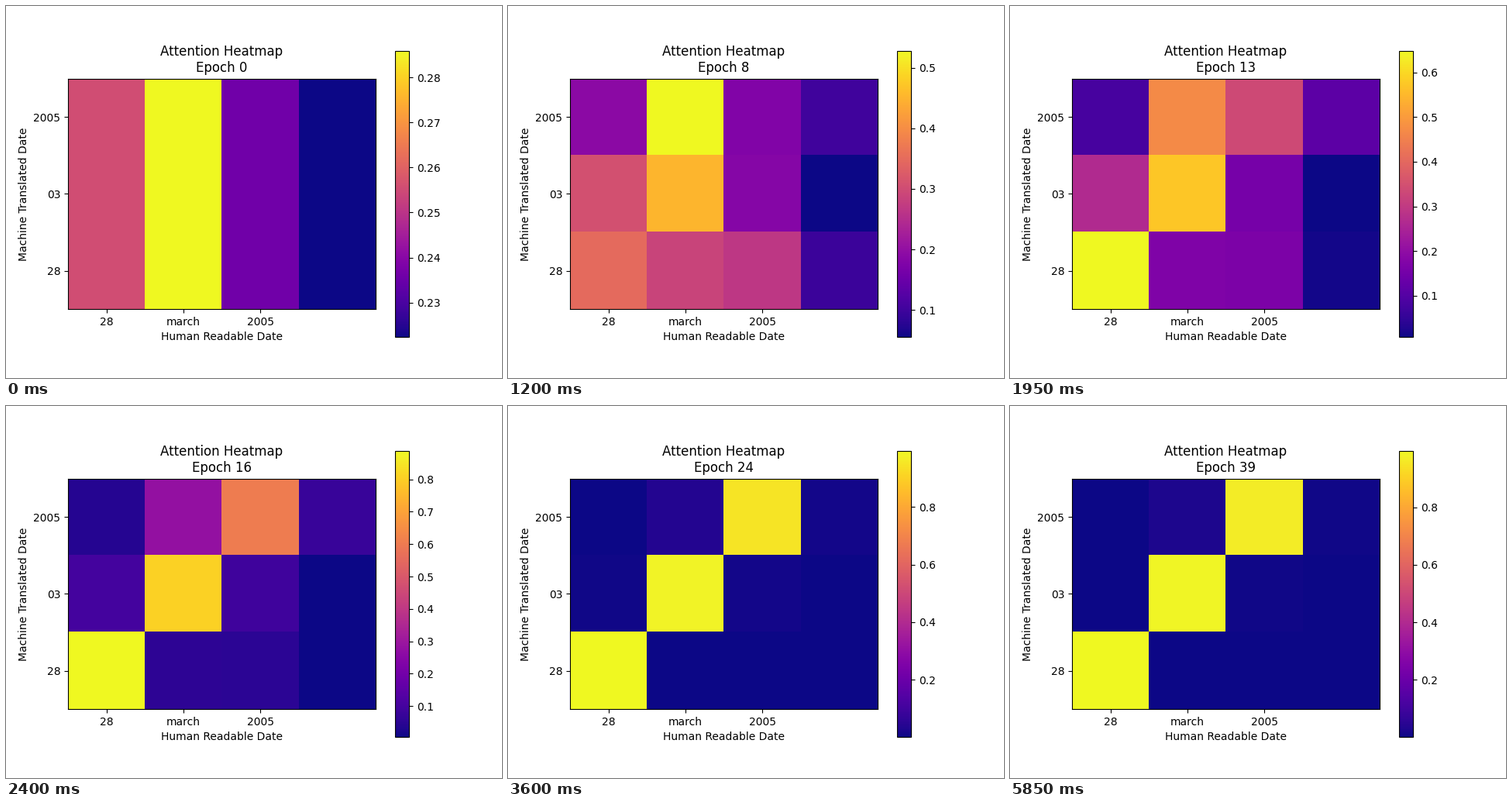
Animation of 640 by 480 pixels, one loop 6 s. Source, as a matplotlib script:

```python
import numpy as np
import matplotlib.pyplot as plt
from matplotlib.animation import FuncAnimation

EPOCHS = 40
FRAME_MS = 150

# Untrained attention, equal for every output token (row)
START = np.array([.2556, .2860, .2361, .2223])

# Logit change per cell, relative to the column each row settles on
EARLY = np.array([[.5, 1.05, 0, -.4], [-.3, 0, -.65, -.9], [0, 0, .1, 0]])
MIDDLE = np.array([[-.45, .4, 0, .2], [.65, 0, .2, -1.9], [0, 0, .1, -2.1]])
FINAL = -np.array([[6.3, 3.9, 0, 4.9], [5.6, 0, 4.7, 8.2], [0, 7, 7, 8.2]])


def learned(epoch):
    """A quick first guess fades, a second one swells, then focus sets in."""
    x = epoch / 5
    guess = x * np.exp(1 - x)
    swell = np.exp(-((epoch - 13) / 5) ** 2)
    focus = 1 / (1 + np.exp((17 - epoch) / 3))
    return EARLY * guess + MIDDLE * swell + FINAL * focus


def attention(epoch):
    weights = START * np.exp(learned(epoch) - learned(0))
    return weights / weights.sum(axis=1, keepdims=True)


fig, ax = plt.subplots(figsize=(6.4, 4.8), dpi=100)
image = ax.imshow(attention(0), cmap="plasma", interpolation="nearest")
fig.colorbar(image, ax=ax)
ax.set_xticks(range(3), ["28", "march", "2005"])
ax.set_yticks(range(3), ["2005", "03", "28"])
ax.set_xlabel("Human Readable Date")
ax.set_ylabel("Machine Translated Date")


def draw(epoch):
    weights = attention(epoch)
    image.set_data(weights)
    image.set_clim(weights.min(), weights.max())
    ax.set_title(f"Attention Heatmap\nEpoch {epoch}")
    return [image]


anim = FuncAnimation(fig, draw, frames=EPOCHS, interval=FRAME_MS,
                     repeat=True, repeat_delay=0, blit=False)
plt.show()
```
